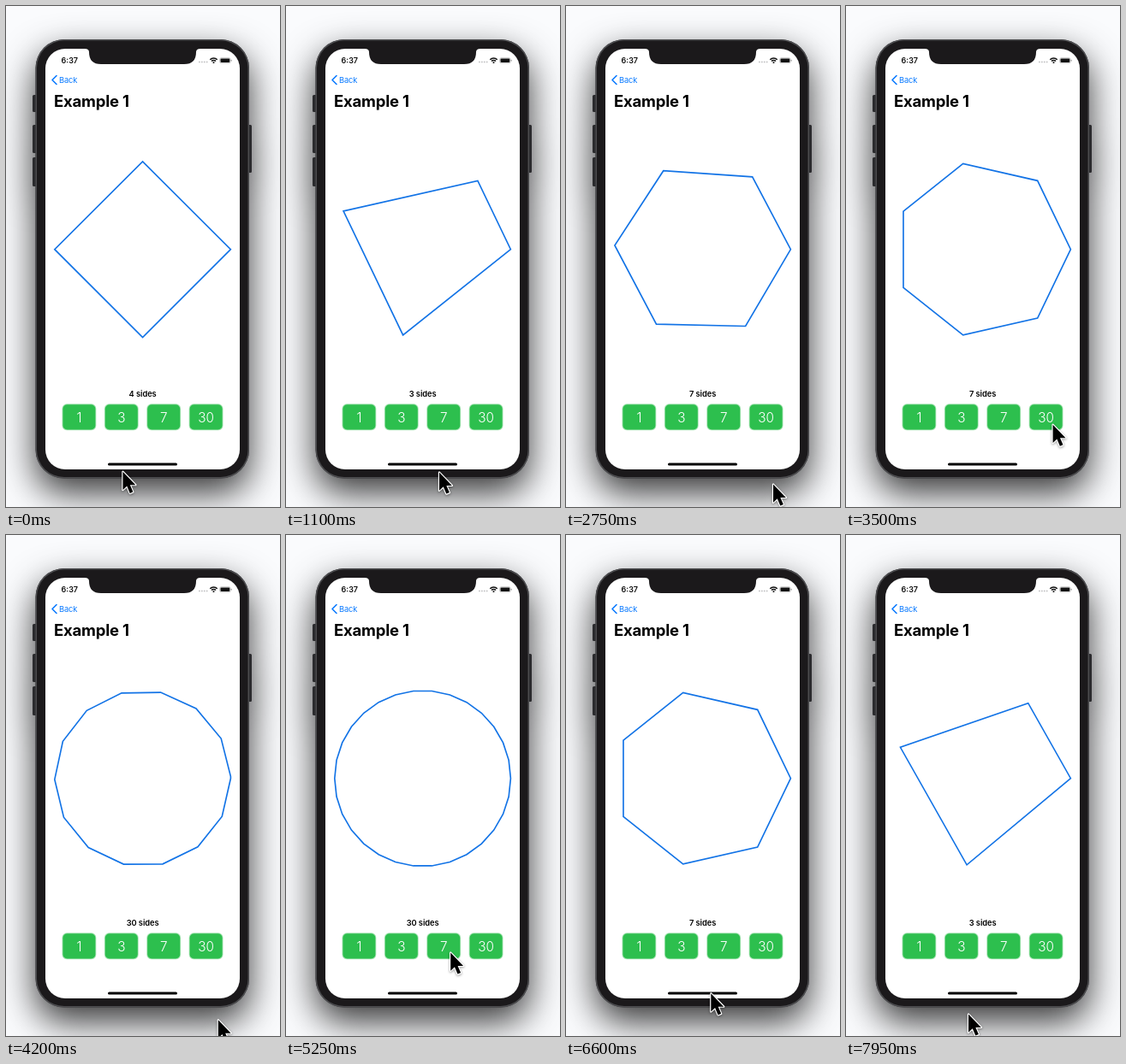
Animation of 320 by 586 pixels, one loop 8000 ms. Source, as an HTML page with a canvas:

```html
<!DOCTYPE html>
<html lang="en">
<head>
<meta charset="utf-8">
<title>Polygon sides</title>
<style>
html, body { margin: 0; width: 100%; height: 100%; overflow: hidden; background: #fafbfd; }
canvas { display: block; width: 320px; height: 586px; }
</style>
</head>
<body>
<canvas id="stage"></canvas>
<script>
const W = 320, H = 586, LOOP = 8000, MORPH = 1000;
const dpr = Math.max(1, window.devicePixelRatio || 1);
const FONT = 'Inter, Roboto, sans-serif';
const BLUE = '#1273e6', LINK = '#0a7aff', INK = '#111', BEZEL = '#1b191b';

const choices = [1, 3, 7, 30];
const buttonX = i => 85.4 + i * 49.4;

// Each tap picks a number of sides, then the pointer rests at x, y
const home = { x: 131, y: 582 };
const taps = [
  { time: 600, sides: 3, x: 178, y: 543 },
  { time: 2112, sides: 7, x: 241, y: 557 },
  { time: 3817, sides: 30, x: 247, y: 567 },
  { time: 5400, sides: 7, x: 184, y: 562 },
  { time: 7217, sides: 3, x: 142, y: 558 }
];

function makeContext(canvas) {
  canvas.width = Math.round(W * dpr);
  canvas.height = Math.round(H * dpr);
  const c = canvas.getContext('2d');
  c.scale(dpr, dpr);
  return c;
}

function roundRect(c, x, y, w, h, r, fill) {
  c.beginPath();
  c.roundRect(x, y, w, h, r);
  c.fillStyle = fill;
  c.fill();
}

function trace(c, points) {
  c.beginPath();
  for (const [x, y] of points) c.lineTo(x, y);
}

function text(c, str, x, y, size, weight, color, align = 'left', spacing = 0) {
  c.font = `${weight} ${size}px ${FONT}`;
  c.letterSpacing = spacing + 'px';
  c.textAlign = align;
  c.fillStyle = color;
  c.fillText(str, x, y);
}

function withShadow(c, color, blur, dy, draw) {
  c.save();
  c.shadowColor = color;
  c.shadowBlur = blur * dpr;
  c.shadowOffsetY = dy * dpr;
  draw();
  c.restore();
}

function drawPhone(c) {
  c.fillStyle = '#fafbfd';
  c.fillRect(0, 0, W, H);

  // One silhouette, side keys included, casts the shadow
  c.beginPath();
  c.roundRect(34.5, 39, 249.5, 513.5, 33.5);
  for (const [y, h] of [[104, 20], [139, 33], [177, 34]]) c.roundRect(31, y, 5, h, 1.5);
  c.roundRect(282, 139, 5, 56, 1.5);
  c.fillStyle = '#2b2b2e';
  withShadow(c, 'rgba(0,0,0,.78)', 41, 17, () => c.fill());

  roundRect(c, 34.5, 39, 249.5, 513.5, 33.5, '#4c4c4f');
  roundRect(c, 36, 40.5, 246.5, 510.5, 32, BEZEL);
  roundRect(c, 46, 50, 227, 492, 23, '#fff');

  // Notch
  c.beginPath();
  c.moveTo(92, 49);
  c.lineTo(92, 50);
  c.quadraticCurveTo(97, 50, 97, 54);
  c.quadraticCurveTo(97, 68, 111, 68);
  c.lineTo(208, 68);
  c.quadraticCurveTo(222, 68, 222, 54);
  c.quadraticCurveTo(222, 50, 227, 50);
  c.lineTo(227, 49);
  c.fillStyle = BEZEL;
  c.fill();
}

function drawStatus(c) {
  text(c, '6:37', 64.5, 67, 9, 600, INK);
  for (let i = 0; i < 4; i++) roundRect(c, 225 + i * 2.9, 64.6, 1.9, 1.9, 1, '#c4c4c6');

  // Wi-Fi
  c.strokeStyle = c.fillStyle = INK;
  c.lineWidth = 1.5;
  for (const r of [6, 3.6]) {
    c.beginPath();
    c.arc(242.5, 67, r, -Math.PI * 0.75, -Math.PI * 0.25);
    c.stroke();
  }
  c.beginPath();
  c.moveTo(242.5, 67.3);
  c.arc(242.5, 67.3, 2, -Math.PI * 0.75, -Math.PI * 0.25);
  c.fill();

  // Battery
  c.lineWidth = 0.6;
  c.strokeStyle = '#999';
  c.beginPath();
  c.roundRect(249.7, 60.8, 12.4, 6, 1.7);
  c.stroke();
  roundRect(c, 250.5, 61.6, 10.8, 4.4, 1, INK);
  roundRect(c, 262.7, 62.8, 0.9, 2, 0.5, '#999');
}

function drawControls(c) {
  c.strokeStyle = LINK;
  c.lineWidth = 1.6;
  c.lineCap = c.lineJoin = 'round';
  trace(c, [[59, 81.5], [54, 86.5], [59, 91.5]]);
  c.stroke();
  text(c, 'Back', 62, 89.8, 9.3, 400, LINK, 'left', -0.15);
  text(c, 'Example 1', 56, 118.2, 18.5, 700, '#000', 'left', -0.2);

  choices.forEach((n, i) => {
    const x = buttonX(i);
    roundRect(c, x - 19.9, 465.3, 39.8, 31, 5.6, '#a4e3b1');
    roundRect(c, x - 19, 466.2, 38, 29.2, 5, '#2dbf4e');
    text(c, n, x, 486.5, 15.3, 300, '#fff', 'center');
  });
  roundRect(c, 119, 534.4, 81, 3, 1.5, '#000');
}

function smooth(u) {
  u = Math.min(1, Math.max(0, u));
  return u * u * (3 - 2 * u);
}

// Ease-in-out: cubic Bezier (.42, 0, .58, 1), solved for x by bisection
function ease(x) {
  if (x <= 0) return 0;
  if (x >= 1) return 1;
  let lo = 0, hi = 1;
  for (let i = 0; i < 24; i++) {
    const u = (lo + hi) / 2, v = 1 - u;
    if (1.26 * u * v * v + 1.74 * u * u * v + u * u * u < x) lo = u;
    else hi = u;
  }
  return smooth(lo);
}

function polygonAt(t) {
  let label = 4, sides = 4;
  for (const tap of taps) {
    if (t < tap.time) break;
    sides += (tap.sides - sides) * ease((t - tap.time) / MORPH);
    label = tap.sides;
  }
  return { label, sides };
}

// Before each tap the pointer glides to the button, after it to the resting place
function pointerAt(t) {
  let { x, y } = home;
  const pull = (tx, ty, k) => {
    x += (tx - x) * k;
    y += (ty - y) * k;
  };
  for (const tap of taps) {
    const dt = t - tap.time;
    pull(buttonX(choices.indexOf(tap.sides)) + 7, 486, smooth((dt + 860) / 590));
    pull(tap.x, tap.y, smooth((dt - 60) / 360));
  }
  return [x, y];
}

function drawPolygon(c, sides) {
  const count = Math.ceil(sides - 1e-6), step = 2 * Math.PI / sides;
  c.beginPath();
  for (let i = 0; i < count; i++) {
    c.lineTo(159.6 + 102.8 * Math.cos(i * step), 284.7 + 102.8 * Math.sin(i * step));
  }
  c.closePath();
  c.strokeStyle = BLUE;
  c.lineWidth = 1.65;
  c.lineJoin = 'miter';
  c.stroke();
}

function drawPointer(c, x, y) {
  c.save();
  c.translate(x + 1, y + 2.6);
  c.scale(0.9, 0.9);
  trace(c, [[0, 0], [0, 23.5], [5.3, 18.6], [9.2, 27.8], [13.2, 26.1], [9.3, 17], [16.5, 17]]);
  c.closePath();
  c.lineJoin = 'round';
  c.lineWidth = 2.6;
  c.strokeStyle = '#fff';
  withShadow(c, 'rgba(0,0,0,.4)', 3, 1, () => c.stroke());
  c.fillStyle = '#000';
  c.fill();
  c.restore();
}

const base = document.createElement('canvas');
const back = makeContext(base);
drawPhone(back);
drawStatus(back);
drawControls(back);

const ctx = makeContext(document.getElementById('stage'));

function draw(t) {
  ctx.drawImage(base, 0, 0, W, H);
  const { label, sides } = polygonAt(t);
  drawPolygon(ctx, sides);
  text(ctx, label + ' sides', 159.6, 456.6, 9.3, 600, '#000', 'center', -0.05);
  drawPointer(ctx, ...pointerAt(t));
}

const begin = performance.now();
function frame() {
  draw((performance.now() - begin) % LOOP);
  requestAnimationFrame(frame);
}
frame();
</script>
</body>
</html>
```
